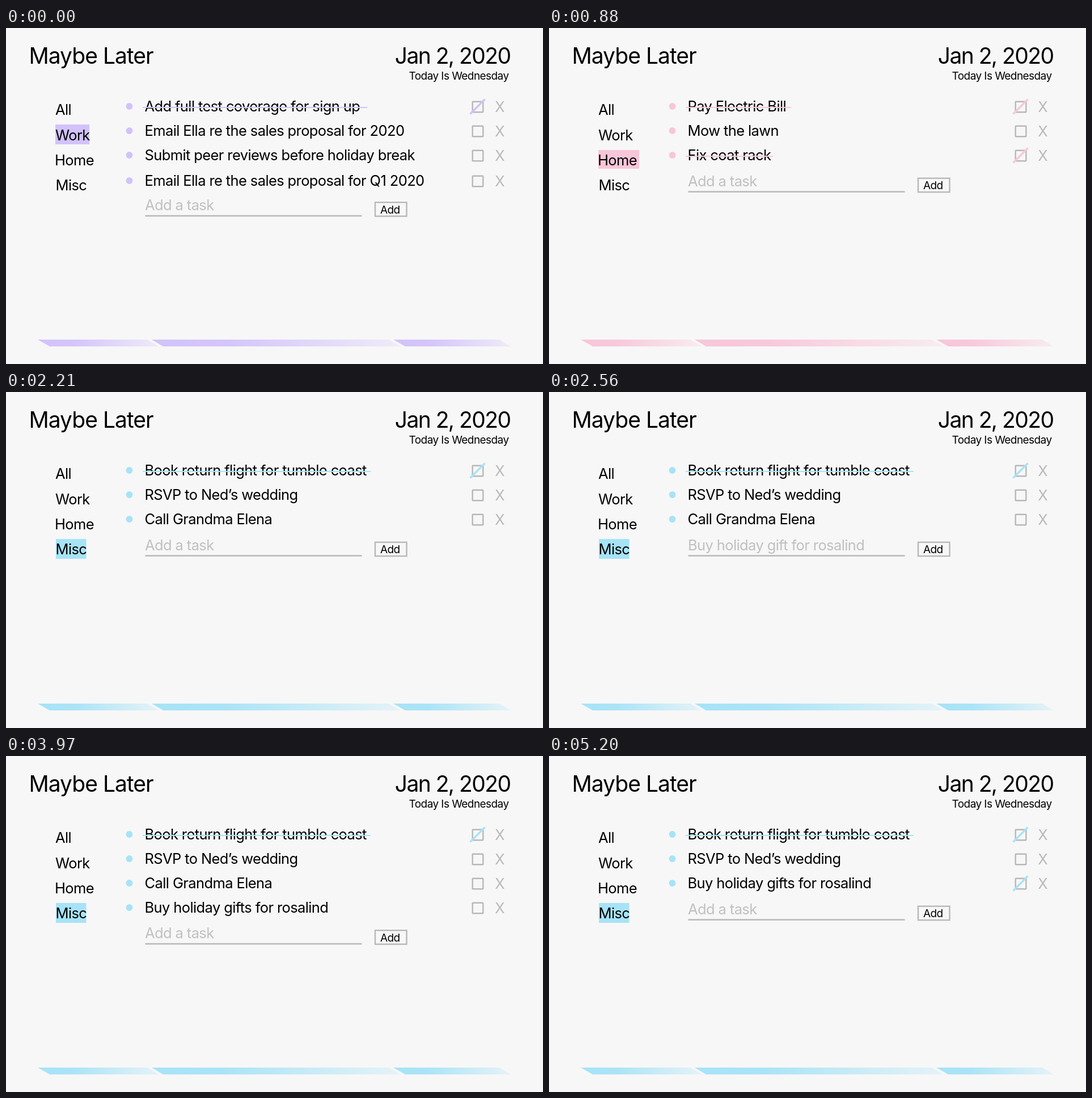
Animation, 947 px wide and 592 px high, one loop 6 s. Source, as an HTML page:

```html
<!DOCTYPE html>
<html lang="en">
<head>
<meta charset="utf-8">
<title>Maybe Later</title>
<style>
  html, body { margin: 0; width: 100%; height: 100%; overflow: hidden; background: #f7f7f7; }
  svg { display: block; width: 947px; height: 592px; }
  text {
    font: 400 25.5px Inter, "Open Sans", sans-serif;
    font-optical-sizing: none;
    letter-spacing: -.024em;
    fill: #000;
  }
  .title { font-size: 39px; letter-spacing: -.025em; }
  .date { font-size: 39px; letter-spacing: -.04em; }
  .small { font-size: 19px; letter-spacing: -.03em; }
  .hint { fill: #c0c0c0; }
  .x { fill: #b8b8b8; letter-spacing: 0; text-anchor: middle; }
  .end { text-anchor: end; }
  .box { fill: none; stroke: #b8b8b8; stroke-width: 2.4; }
  .accent { fill: var(--accent); }
  .mark { stroke: var(--accent); }
  stop { stop-color: var(--accent); }
</style>
</head>
<body>
<svg id="stage" viewBox="0 0 947 592">
  <defs>
    <linearGradient id="fade">
      <stop offset="0"/>
      <stop offset=".3" stop-opacity=".95"/>
      <stop offset="1" stop-opacity=".22"/>
    </linearGradient>
  </defs>
  <text class="title" x="40.5" y="63">Maybe Later</text>
  <text class="date end" x="889.5" y="63">Jan 2, 2020</text>
  <text class="small end" x="886.5" y="91">Today Is Wednesday</text>
  <rect id="tab" class="accent"/>
  <text x="87" y="153">All</text>
  <text x="87" y="197.5">Work</text>
  <text x="86" y="242">Home</text>
  <text x="87.5" y="286">Misc</text>
  <g id="list"></g>
  <g fill="url(#fade)">
    <path d="M56 549H249L270 561H77Z"/>
    <path d="M257 549H675L696 561H277Z"/>
    <path d="M683 549H870L890 561H704Z"/>
  </g>
</svg>
<script>
const work = { accent: '#d2c2fb', tab: [87, 170, 60, 35] };
const home = { accent: '#f8c6d9', tab: [87, 215, 72, 33] };
const misc = { accent: '#a7e3f7', tab: [88, 259, 53.5, 35] };

// A task is [text, end of its strike line (0 while open), vertical nudge].
const trip = ['Book return flight for tumble coast', 643];
const party = ['RSVP to Ned’s wedding', 0];
const call = ['Call Grandma Elena', 0];
const gifts = ['Buy holiday gifts for rosalind', 0];
const prompt = 'Add a task';

const steps = [
  { ms: 880, theme: work, hint: prompt, tasks: [
    ['Add full test coverage for sign up', 637],
    ['Email Ella re the sales proposal for 2020', 0],
    ['Submit peer reviews before holiday break', 0],
    ['Email Ella re the sales proposal for Q1 2020', 0, 2]] },
  { ms: 800, theme: home, hint: prompt, tasks: [
    ['Pay Electric Bill', 427],
    ['Mow the lawn', 0],
    ['Fix coat rack', 395]] },
  { ms: 880, theme: misc, hint: prompt, tasks: [trip, party, call] },
  { ms: 880, theme: misc, hint: 'Buy holiday gift for rosalind', tasks: [trip, party, call] },
  { ms: 880, theme: misc, hint: prompt, tasks: [trip, party, call, gifts] },
  { ms: 880, theme: misc, hint: prompt, tasks: [trip, party, [call[0], 484], gifts] },
  // The slash stays in the third slot after its task is removed.
  { ms: 800, theme: misc, hint: prompt, slash: 2, tasks: [trip, party, gifts] }
];
const loop = steps.reduce((sum, s) => sum + s.ms, 0);

const stage = document.getElementById('stage');
const tab = document.getElementById('tab');
const list = document.getElementById('list');

function row([label, strike, nudge = 0], i, slash) {
  return `<g transform="translate(0 ${i * 43 + nudge})">
    <circle class="accent" cx="217.5" cy="138" r="5.9"/>
    <text x="244.5" y="147">${label}</text>
    ${strike ? `<path class="mark" stroke-width="2.2" d="M241 140H${strike}"/>` : ''}
    <rect class="box" x="822.7" y="129.7" width="18.6" height="18.6" rx=".5"/>
    ${strike || slash ? '<path class="mark" stroke-width="3.4" d="M818.5 151.5L844.5 125.5"/>' : ''}
    <text class="x" x="871" y="148">X</text>
  </g>`;
}

function entry(hint, count) {
  return `<g transform="translate(0 ${(count - 4) * 42.5})">
    <text class="hint" x="245" y="321">${hint}</text>
    <path class="box" d="M245.5 331H627.5"/>
    <rect class="box" x="651" y="307.2" width="55.5" height="24.4"/>
    <text class="small" x="660" y="326.5">Add</text>
  </g>`;
}

function show({ theme, tasks, hint, slash }) {
  stage.style.setProperty('--accent', theme.accent);
  ['x', 'y', 'width', 'height'].forEach((k, i) => tab.setAttribute(k, theme.tab[i]));
  list.innerHTML = tasks.map((t, i) => row(t, i, i === slash)).join('') + entry(hint, tasks.length);
}

const start = performance.now();
let current;
function tick() {
  let t = (performance.now() - start) % loop;
  const step = steps.find(s => (t -= s.ms) < 0);
  if (step !== current) show(current = step);
  requestAnimationFrame(tick);
}
tick();
</script>
</body>
</html>
```
